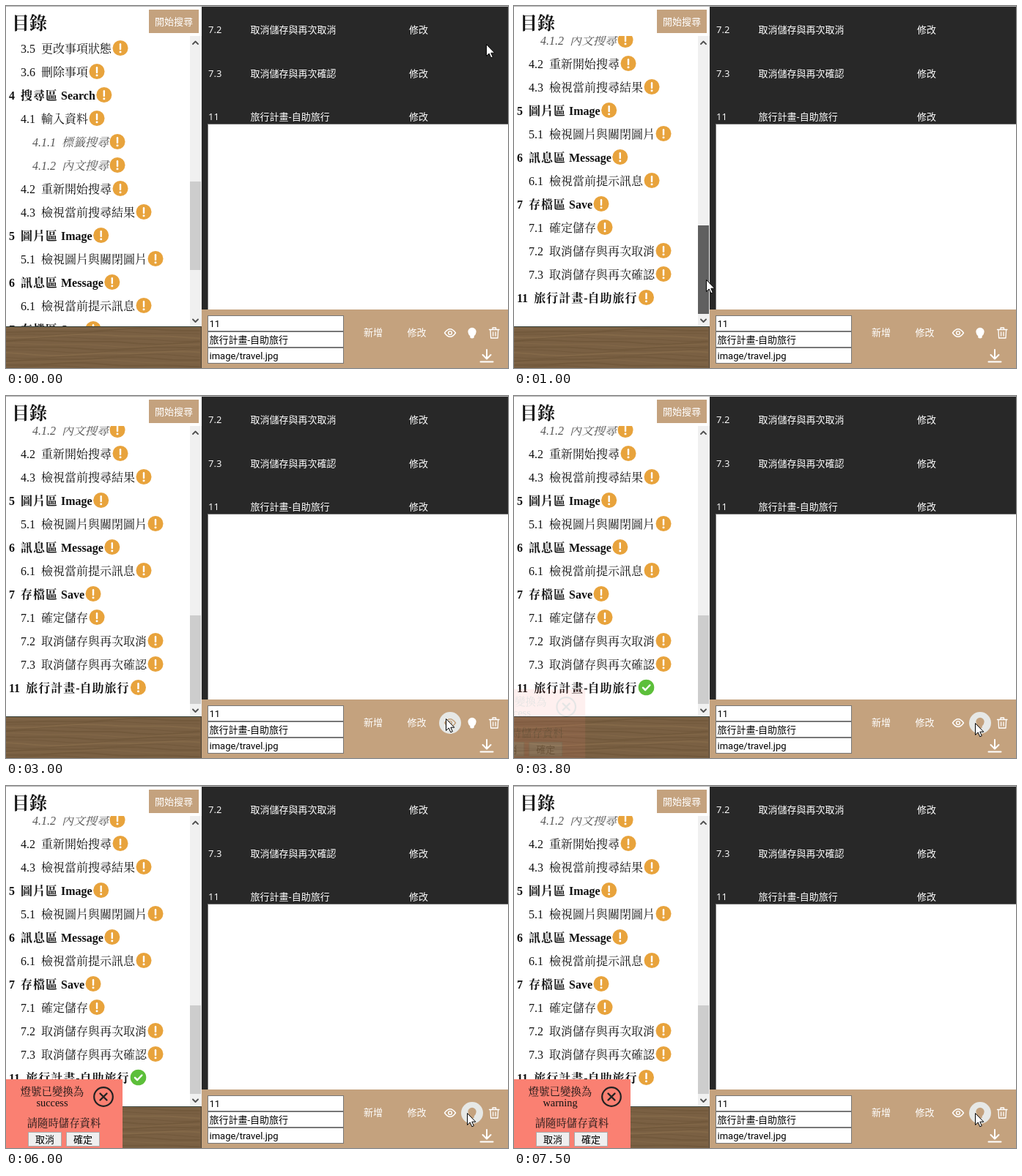
Recreate the animation shown at these times as an HTML page. Size 685 by 495 pixels, loop 8 s.

```html
<!DOCTYPE html>
<html lang="zh-Hant">
<head>
<meta charset="utf-8">
<style>
  html, body { margin: 0; width: 100%; height: 100%; overflow: hidden; background: #282828; }
  svg { display: block; }
  text { white-space: pre; }
  .sans { font: 13px 'Open Sans', 'Noto Sans CJK TC', 'Noto Sans CJK', sans-serif; }
  .input { font: 13px Roboto, 'Noto Sans CJK TC', 'Noto Sans CJK', sans-serif; }
  .serif { font: 16px 'Liberation Serif', 'Noto Serif CJK TC', 'Noto Sans CJK TC', 'Noto Sans CJK', serif; fill: #111; }
  .part { font-weight: bold; }
  .sub { font-style: italic; fill: #555; }
  .note { font-size: 14.4px; text-anchor: middle; }
  .line { fill: none; stroke-linecap: round; stroke-linejoin: round; }
</style>
</head>
<body>
<svg id="stage" width="685" height="495" viewBox="0 0 685 495"></svg>
<script>
const TAN = '#c4a27e';
const SCROLL = 171;
const LOOP = 8000;

const items = [
  ['3.5', '更改事項狀態'], ['3.6', '刪除事項'],
  ['4', '搜尋區 Search'], ['4.1', '輸入資料'], ['4.1.1', '標籤搜尋'], ['4.1.2', '內文搜尋'],
  ['4.2', '重新開始搜尋'], ['4.3', '檢視當前搜尋結果'],
  ['5', '圖片區 Image'], ['5.1', '檢視圖片與關閉圖片'],
  ['6', '訊息區 Message'], ['6.1', '檢視當前提示訊息'],
  ['7', '存檔區 Save'], ['7.1', '確定儲存'], ['7.2', '取消儲存與再次取消'], ['7.3', '取消儲存與再次確認'],
  ['11', '旅行計畫-自助旅行']
];

const rect = (x, y, w, h, fill, more = '') =>
  `<rect x="${x}" y="${y}" width="${w}" height="${h}" fill="${fill}" ${more}/>`;
const text = (x, y, s, cls, more = '') => `<text x="${x}" y="${y}" class="${cls}" ${more}>${s}</text>`;
const line = (d, color, width, more = '') =>
  `<path class="line" d="${d}" stroke="${color}" stroke-width="${width}" ${more}/>`;

function tocRow([num, label], i) {
  const level = num.split('.').length;
  // Bold ideographs are set one pixel wider
  const words = level > 1 ? label
    : label.replace(/[一-龥]+/g, run => `<tspan letter-spacing="1">${run}</tspan>`);
  const cls = 'serif ' + ['part', '', 'sub'][level - 1];
  return `<g class="row" transform="translate(${16 * level - 12} ${58 + 32 * i})">
    ${text(0, 5.5, num + '  ' + words, cls)}
    <g class="mark"><circle r="10.5" fill="#e8a33c"/>
      ${line('M0 -5.2V1.4', '#fff', 2.4)}<circle cy="5.2" r="1.5" fill="#fff"/></g></g>`;
}

function wood() {
  let s = rect(0, 438, 267, 57, '#7a6043');
  for (let i = 0; i < 15; i++) {
    let d = '';
    for (let x = 0; x <= 267; x += 12) {
      const y = 440 + i * 3.9 + 2 * Math.sin(x / 47 + i * 0.7) + Math.sin(x / 19 + i * 1.9);
      d += (d ? 'L' : 'M') + x + ' ' + y.toFixed(1);
    }
    s += line(d, i % 3 ? '#624a30' : '#937652', 1 + i % 2, 'opacity=".35"');
  }
  return `<g clip-path="url(#woodClip)">${s}</g>`
    + rect(0, 438, 267, 1, '#35403a') + rect(266, 438, 1, 57, '#4a4034');
}

const tableRow = (y, num, title) =>
  text(276, y, num, 'sans', 'fill="#fff"') + text(333.5, y, title, 'sans', 'fill="#fff"')
  + text(550, y, '修改', 'sans', 'fill="#fff"');

const field = (y, s) =>
  rect(275.5, y + .5, 185, 21, '#fff', 'stroke="#777"') + text(277.5, y + 16, s, 'input');

const button = (x, s) =>
  rect(x + .5, 473.5, 45, 19, '#efefef', 'stroke="#aaa"') + text(x + 10, 488, s, 'sans');

const closeIcon = `<circle cx="133" cy="425" r="12.8" fill="none" stroke="#222" stroke-width="2.2"/>`
  + line('M128.5 420.5l9 9m0 -9l-9 9', '#222', 2.4);
const message = (id, state) => `<g id="${id}">${text(63, 422.5, '燈號已變換為', 'serif note')}
  ${text(63, 438, state, 'serif note')}${closeIcon}</g>`;

const stage = document.getElementById('stage');
stage.innerHTML = `
  <defs>
    <clipPath id="listClip"><rect y="41" width="251" height="397"/></clipPath>
    <clipPath id="woodClip"><rect y="438" width="267" height="57"/></clipPath>
    <clipPath id="noteClip"><rect y="401" width="159" height="94"/></clipPath>
  </defs>
  ${rect(0, 0, 685, 495, '#282828')}
  ${tableRow(36.5, '7.2', '取消儲存與再次取消')}
  ${tableRow(96.5, '7.3', '取消儲存與再次確認')}
  ${tableRow(155.5, '11', '旅行計畫-自助旅行')}
  ${rect(275.5, 161.5, 411, 260, '#fff', 'stroke="#777"')}
  ${rect(267, 415, 418, 80, TAN)}
  ${field(423, '11')}${field(445, '旅行計畫-自助旅行')}${field(467, 'image/travel.jpg')}
  ${text(488, 451, '新增', 'sans', 'fill="#fff"')}${text(547.5, 451, '修改', 'sans', 'fill="#fff"')}
  <circle id="eyeDisc" cx="606" cy="447" r="15" fill="#e6e8e6"/>
  <g id="eye">${line('M598.5 447Q606 436.5 613.5 447Q606 457.5 598.5 447Z', 'currentColor', 1.4)}
    <circle cx="606" cy="447" r="2.4" fill="none" stroke="currentColor" stroke-width="1.4"/></g>
  <circle id="bulbDisc" cx="636" cy="447" r="15" fill="#e6e8e6"/>
  <path id="bulb" fill="currentColor" d="M633.3 451.5Q630.4 448.5 630.3 445.5A5.7 5.7 0 0 1 641.7 445.5Q641.6 448.5 638.7 451.5V453.5Q636 455.5 633.3 453.5Z"/>
  ${line('M659.5 442.5H673M664 442V440H668.5V442M661 443L661.6 454H671L671.6 443M664.6 446V451M668 446V451', '#fff', 1.3)}
  ${line('M656 470V482M650.5 477L656 482.5L661.5 477M647.5 486.5H664.5', '#fff', 2)}
  ${rect(0, 0, 267, 438, '#fff')}
  ${rect(0, 0, 685, 1, '#b4b4b4')}
  ${text(8, 32, '目錄', 'serif part', 'style="font-size:24px"')}
  ${rect(195, 5, 68, 32, TAN)}${text(203, 26, '開始搜尋', 'sans', 'fill="#fff"')}
  <g clip-path="url(#listClip)"><g id="list">${items.map(tocRow).join('')}</g></g>
  ${rect(251, 41, 16, 397, '#f0f0f0')}
  ${rect(251, 240, 15, 121, '#cdcdcd', 'id="thumb"')}
  ${line('M255 52L258.5 48.5L262 52M255 428.5L258.5 432L262 428.5', '#505050', 1.8)}
  ${wood()}
  <g id="note">
    ${rect(0, 401, 159, 94, '#fa8072')}
    <g clip-path="url(#noteClip)">${message('oldMsg', 'success')}${message('newMsg', 'warning')}</g>
    ${text(79, 466, '請隨時儲存資料', 'serif note')}
    ${button(30, '取消')}${button(82, '確定')}
  </g>
  <g id="pointer">
    <path id="arrow" d="M.5 .5V16.5L4.2 13L6.8 18.8L9.3 17.7L6.8 12.2H11.8Z" fill="#fff" stroke="#000"/>
    <path id="hand" d="M-1.5 1.5Q0 -.5 1.5 1.5V7Q3.5 5.8 4.6 7.6Q6.8 6.6 7.6 8.6Q10 8 10 10.5V15Q9 18 7.5 19.5V22H-1.5V19.5L-6.5 12.5Q-7 10 -4.6 10.4L-1.5 13ZM1.5 7V11M4.6 8V11.5M7.6 9V12" fill="#fff" stroke="#000"/>
  </g>`;

const $ = id => document.getElementById(id);
const set = (id, attrs) => { for (const k in attrs) $(id).setAttribute(k, attrs[k]); };

const rows = [...stage.querySelectorAll('.row')];
for (const row of rows) {
  const end = row.querySelector('text').getComputedTextLength() + 12;
  row.querySelector('.mark').setAttribute('transform', `translate(${end} -.5)`);
}
const lastMark = rows[rows.length - 1].querySelector('.mark');
lastMark.insertAdjacentHTML('beforeend', `<g id="done"><circle r="10.8" fill="#5cbf3a"/>
  ${line('M-4.5 .3L-1.3 3.5L4.8 -3', '#fff', 2.5)}</g>`);

const ramp = (t, from, to) => Math.min(1, Math.max(0, (t - from) / (to - from)));

// cubic-bezier(.25, .1, .25, 1)
function ease(x) {
  const bez = (u, a, b) => 3 * (1 - u) ** 2 * u * a + 3 * (1 - u) * u * u * b + u ** 3;
  let lo = 0, hi = 1;
  for (let i = 0; i < 20; i++) {
    const mid = (lo + hi) / 2;
    if (bez(mid, .25, .25) < x) lo = mid; else hi = mid;
  }
  return bez(lo, .1, 1);
}

// time, x, y of the pointer tip
const path = [
  [0, 655, 52], [600, 257, 314], [1000, 262, 374], [1200, 262, 374], [1600, 213, 396],
  [2000, 138, 401], [2100, 138, 401], [3000, 600, 441], [3500, 629, 447], [LOOP, 629, 447]
];
function pointerAt(t) {
  const i = path.findIndex(p => p[0] > t);
  const [a, b] = [path[i - 1], path[i]];
  const k = ramp(t, a[0], b[0]);
  return [a[1] + (b[1] - a[1]) * k, a[2] + (b[2] - a[2]) * k];
}

function hover(name, amount) {
  set(name + 'Disc', { opacity: amount });
  set(name, { color: amount > .4 ? TAN : '#fff' });
}

const slide = (id, p) => set(id, { transform: `translate(${-80 * (1 - p)} 0)`, opacity: p ** 1.5 });

function draw(now) {
  const t = Math.floor(now % LOOP / 100) * 100; // ten pictures a second
  const drag = ramp(t, 600, 1000);
  set('list', { transform: `translate(0 ${-SCROLL * drag})` });
  set('thumb', { y: 240 + 60 * drag, fill: t >= 600 && t < 1300 ? '#606060' : '#cdcdcd' });

  const [x, y] = pointerAt(t);
  const onLink = t > 1200 && x < 169 && y < 410;
  set('pointer', { transform: `translate(${x} ${y})` });
  set('hand', { visibility: onLink ? 'visible' : 'hidden' });
  set('arrow', { visibility: onLink ? 'hidden' : 'visible' });
  hover('eye', t >= 3000 && t < 3400 ? 1 - ramp(t, 3200, 3400) : 0);
  hover('bulb', ramp(t, 3200, 3500));

  set('done', { visibility: t >= 3700 && t < 6100 ? 'visible' : 'hidden' });
  slide('note', ease(ramp(t, 3630, 4630)));
  slide('oldMsg', 1 - ease(ramp(t, 6000, 6500)));
  slide('newMsg', ease(ramp(t, 6500, 7500)));
}

const start = performance.now();
function tick() {
  draw(performance.now() - start);
  requestAnimationFrame(tick);
}
draw(0);
tick();
</script>
</body>
</html>
```
